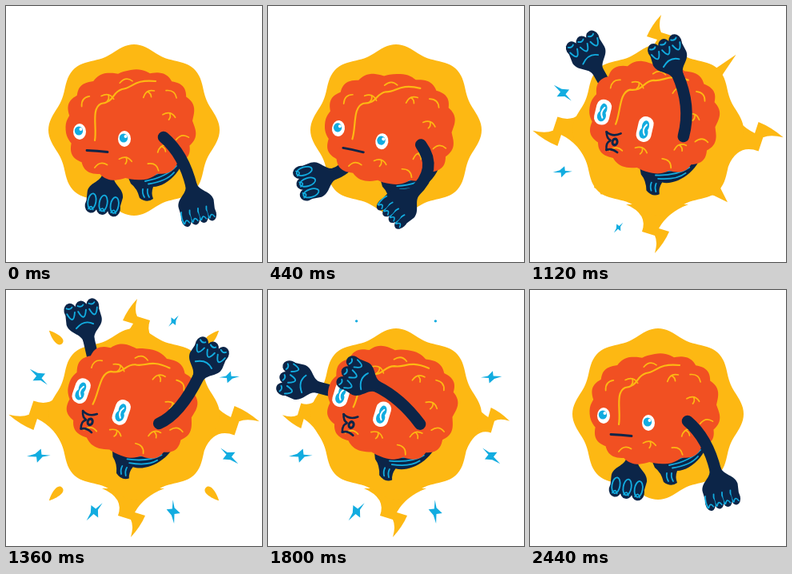
Write an HTML page with a canvas that moves like this. It is 320 px wide and 320 px high and loops after 2480 ms.

```html
<!DOCTYPE html>
<html lang="en">
<head>
<meta charset="utf-8">
<title>Dancing brain</title>
<style>
  html, body { margin: 0; width: 100%; height: 100%; overflow: hidden; background: #fff; }
  canvas { display: block; width: 100vw; height: 100vh; }
</style>
</head>
<body>
<canvas id="stage" width="320" height="320"></canvas>
<script>
const ctx = document.getElementById('stage').getContext('2d');
const LOOP = 2480, STEP = 40, TAU = Math.PI * 2, RAD = Math.PI / 180;
const ORANGE = '#f15022', YELLOW = '#fdb813', NAVY = '#0c2548', BLUE = '#12ace0', WHITE = '#fff';

// body: shift and tilt; arms: elbow and wrist
const poses = {
  rest: { body: [0, 0, 0], near: [222, 185, 232, 226], far: [131, 190, 127, 214] },
  left: { body: [-4, 4, 8], near: [212, 205, 180, 233], far: [112, 200, 78, 209] },
  right: { body: [9, 11, -11], near: [255, 150, 266, 200], far: [182, 200, 188, 223] },
  up: { body: [-1, -10, 13], near: [202, 125, 184, 85], far: [96, 102, 84, 80] },
  upRight: { body: [1, -10, 19], near: [218, 155, 241, 108], far: [110, 90, 103, 60] },
  upLeft: { body: [-1, -8, 17], near: [166, 135, 135, 120], far: [90, 130, 60, 121] }
};

// sag lowers the hands on the way to a pose, bow swings them outwards
const moves = [
  { time: 0, pose: 'rest' },
  { time: 400, pose: 'left', sag: 14, bow: 0 },
  { time: 800, pose: 'right', sag: 10, bow: 0 },
  { time: 1120, pose: 'up', sag: 0, bow: 45 },
  { time: 1360, pose: 'upRight', sag: 0, bow: 0 },
  { time: 1800, pose: 'upLeft', sag: 0, bow: 0 },
  { time: 2320, pose: 'rest', sag: 0, bow: 45 },
  { time: LOOP, pose: 'rest', sag: 0, bow: 0 }
];

const clamp = v => Math.min(1, Math.max(0, v));
const ramp = (t, start, length) => clamp((t - start) / length);
const ease = v => v * v * (3 - 2 * v);
const mix = (a, b, u) => a.map((v, i) => v + (b[i] - v) * u);
const polar = (r, degrees, x, y) => [x + r * Math.cos(degrees * RAD), y + r * Math.sin(degrees * RAD)];

function poseAt(t) {
  const next = moves.findIndex(m => m.time > t);
  const from = moves[next - 1], to = moves[next];
  const u = ease(ramp(t, from.time, to.time - from.time));
  const a = poses[from.pose], b = poses[to.pose], arch = Math.sin(Math.PI * u);
  const arm = (name, side) => {
    const [ex, ey, wx, wy] = mix(a[name], b[name], u);
    return [ex, ey, wx + side * to.bow * arch, wy + to.sag * arch];
  };
  return { body: mix(a.body, b.body, u), near: arm('near', 1), far: arm('far', -1) };
}

function fill(color) { ctx.fillStyle = color; ctx.fill(); }
function stroke(color, width) {
  ctx.strokeStyle = color; ctx.lineWidth = width;
  ctx.lineCap = ctx.lineJoin = 'round';
  ctx.stroke();
}
function polygon(points, color) {
  ctx.beginPath();
  points.forEach(p => ctx.lineTo(...p));
  ctx.closePath();
  fill(color);
}
function ellipse(x, y, rx, ry, color) {
  ctx.beginPath();
  ctx.ellipse(x, y, rx, ry, 0, 0, TAU);
  fill(color);
}
function arc(color, width, x, y, ...curve) {
  ctx.beginPath();
  ctx.moveTo(x, y);
  ctx.quadraticCurveTo(...curve);
  stroke(color, width);
}
function at(x, y, degrees, scale, draw) {
  ctx.save();
  ctx.translate(x, y);
  ctx.rotate(degrees * RAD);
  ctx.scale(scale, scale);
  draw();
  ctx.restore();
}

function drawBadge() {
  const points = [];
  for (let a = 0; a < 360; a += 2) points.push(polar(102.5 + 4.5 * Math.cos(8 * a * RAD), a, 160, 155));
  polygon(points, YELLOW);
}

function drawBolt(size) {
  const d = v => 98 + (v - 98) * size, s = v => v * Math.sqrt(size);
  ctx.beginPath();
  ctx.moveTo(88, -38);
  ctx.quadraticCurveTo(98, -12, d(118), s(-1));
  ctx.lineTo(d(122), s(-14));
  ctx.quadraticCurveTo(d(136), s(-8), d(149), s(4));
  ctx.quadraticCurveTo(d(135), s(0), d(127), s(4));
  ctx.lineTo(d(122), s(20));
  ctx.quadraticCurveTo(100, 12, 88, 40);
  fill(YELLOW);
}

function drawDrop() {
  ctx.beginPath();
  ctx.moveTo(12, 0);
  ctx.bezierCurveTo(3, -5, -11, -8, -11, 0);
  ctx.bezierCurveTo(-11, 8, 3, 5, 12, 0);
  fill(YELLOW);
}

function drawBurst(t) {
  for (let a = 0; a < 360; a += 90) {
    const leave = 1760 + 90 * Math.sin(a * RAD);
    const size = ease(ramp(t, 960, 140)) * (1 - ramp(t, leave, 160));
    if (size) at(160, 160, a, 1, () => drawBolt(size * (a % 180 ? 1 : 1.15)));
  }
  // Diagonal spikes grow clockwise, then break off as drops
  for (let i = 0; i < 4; i++) at(160, 157, 90 * i - 45, 1, () => {
    const spike = ease(ramp(t, 1020 + 40 * i, 100)) * (1 - ramp(t, 1150 + 20 * i, 100));
    const fly = ramp(t, 1180, 320);
    if (spike) polygon([[92, -16], [106, -5], [100 + 37 * spike, 1], [106, 7], [92, 16]], YELLOW);
    if (fly > 0 && fly < 1) at(128 + 18 * fly, 0, 0, Math.min(1, 3 * (1 - fly)), drawDrop);
  });
}

function drawSparks(t) {
  for (let i = 0; i < 8; i++) {
    const angle = 202.5 - 45 * i;
    const [x, y] = polar(129, angle, 160, 158);
    const size = Math.sqrt(ramp(t, 950 + 57 * i, 170)) * (1 - ramp(t, 1680 + y, 100));
    if (!size) continue;
    if (size < 0.35) ellipse(x, y, 9 * size, 9 * size, BLUE);
    else at(x, y, angle, size, () => polygon(
      [[-14, -5], [-4, -3], [5, -7], [3, 0], [14, 5], [3, 4], [-6, 7], [-4, 0]], BLUE));
  }
}

function drawHand(x, y, angle, fist, loops) {
  at(x, y, angle, 1, () => {
    ctx.beginPath();
    ctx.moveTo(-3, -7);
    ctx.bezierCurveTo(8, -8, 10, -22, 22, -23);
    ctx.lineTo(38, -21);
    ctx.lineTo(38, 21);
    ctx.lineTo(22, 22);
    ctx.bezierCurveTo(10, 22, 8, 8, -3, 7);
    fill(NAVY);

    const count = fist || loops ? 3 : 4, gap = 43 / count;
    for (let i = 0; i < count; i++) {
      const f = gap * (i - (count - 1) / 2);
      ellipse(38, f, 9.5, gap / 2 + 0.8, NAVY);
      if (fist) {
        arc(BLUE, 1.9, 35, f - 5, 19, f, 35, f + 5);
        arc(BLUE, 1.9, 42, f - 4, 39, f, 42, f + 3);
      } else if (loops) {
        ctx.beginPath();
        ctx.ellipse(33, f, 10, 5, 0, 0, TAU);
        stroke(BLUE, 1.8);
      } else {
        arc(BLUE, 1.8, 28, f + 4, 34, f + 6, 43, f + 4);
      }
      if (!fist) arc(BLUE, 1.6, 43, f - 3, 36, f, 43, f + 3);
    }
    if (fist) arc(BLUE, 1.9, 15, -12, 24, 0, 16, 10);
  });
}

function drawArm(shoulder, [ex, ey, wx, wy], fist, loops) {
  ctx.beginPath();
  ctx.moveTo(...shoulder);
  ctx.quadraticCurveTo(ex, ey, wx, wy);
  stroke(NAVY, 14.5);
  drawHand(wx, wy, Math.atan2(wy - ey, wx - ex) / RAD, fist, loops);
}

function drawStem() {
  ctx.beginPath();
  ctx.moveTo(150, 208);
  ctx.lineTo(224, 172);
  ctx.bezierCurveTo(228, 200, 203, 226, 184, 226);
  ctx.quadraticCurveTo(181, 234, 184, 241);
  ctx.quadraticCurveTo(176, 247, 167, 240);
  ctx.quadraticCurveTo(164, 228, 156, 222);
  fill(NAVY);
  for (let i = 0; i < 4; i++) {
    arc(BLUE, 1.8, 166 + 4 * i, 212 + 3.5 * i, 198 + i, 204 + 5 * i, 219 - 3 * i, 184 + 8 * i);
    if (i < 2) arc(BLUE, 1.8, 171 + 6 * i, 229, 170 + 6 * i, 234, 173 + 6 * i, 239);
  }
}

function drawBrain() {
  const power = v => Math.sign(v) * Math.abs(v) ** 0.85;
  const rim = (degrees, k) => {
    const a = degrees * RAD;
    return [80 * k * power(Math.cos(a)), 68 * k * power(Math.sin(a))];
  };
  at(156, 149, -4, 1, () => {
    const points = [];
    for (let a = 0; a < 360; a += 2) points.push(rim(a, 0.965 + 0.055 * Math.abs(Math.sin(7.5 * a * RAD))));
    polygon(points, ORANGE);
    // Small folds ring the brain, leaving the face free
    for (let i = 0; i < 11; i++) {
      const [x, y] = rim(i * 27 - 145, i % 2 ? 0.62 : 0.82);
      at(x, y, (i * 67) % 90 - 45, 1, () => {
        arc(YELLOW, 1.7, -8, 2, 0, -6, 8, 1);
        if (i % 2) arc(YELLOW, 1.7, 0, -2, 3, 2, 1, 6);
      });
    }
  });
  ctx.beginPath();
  ctx.moveTo(111, 168);
  ctx.bezierCurveTo(114, 152, 106, 128, 119, 122);
  ctx.bezierCurveTo(136, 120, 132, 108, 145, 104);
  ctx.bezierCurveTo(158, 103, 160, 91, 187, 94);
  stroke(YELLOW, 2.2);
}

function drawEye(excited) {
  if (excited) {
    ctx.beginPath();
    ctx.roundRect(-9.5, -16, 19, 32, 9);
    fill(WHITE);
    ellipse(0, -4, 4.5, 7, BLUE);
    ellipse(-0.5, 5, 5.5, 7, BLUE);
    arc(WHITE, 2, 1, -6, -4, 1, 1, 7);
  } else {
    ellipse(0, 0, 8, 10, WHITE);
    ellipse(-1, -1, 5.2, 5.6, BLUE);
    ellipse(1.5, -3, 2, 2, WHITE);
  }
}

function drawFace(excited) {
  at(92, 157, 0, 1, () => drawEye(excited));
  at(148, 166, 0, 1, () => drawEye(excited));
  if (excited) {
    arc(NAVY, 2.6, 120, 178, 111, 185, 102, 180);
    arc(NAVY, 2.6, 102, 180, 104, 188, 109, 189);
    arc(NAVY, 2.6, 109, 190, 104, 193, 107, 202);
    arc(NAVY, 2.6, 107, 202, 113, 198, 121, 202);
    ellipse(115, 190, 4.5, 5.5, NAVY);
    ellipse(115, 190, 1.5, 2.2, ORANGE);
  } else {
    arc(NAVY, 2.8, 101, 180.5, 114, 181, 127, 182.5);
  }
}

function render(t) {
  const { body: [dx, dy, tilt], near, far } = poseAt(t);
  const excited = t >= 1000 && t < 2000;
  const inBody = draw => at(155 + dx, 150 + dy, tilt, 1, () => { ctx.translate(-155, -150); draw(); });
  const attach = (x, y) => {
    const c = Math.cos(tilt * RAD), s = Math.sin(tilt * RAD);
    return [155 + dx + (x - 155) * c - (y - 150) * s, 150 + dy + (x - 155) * s + (y - 150) * c];
  };

  ctx.fillStyle = WHITE;
  ctx.fillRect(0, 0, 320, 320);
  drawBurst(t);
  drawBadge();
  drawSparks(t);
  inBody(drawStem);
  drawArm(attach(115, 150), far, excited, true);
  inBody(() => { drawBrain(); drawFace(excited); });
  drawArm(attach(197, 164), near, excited, false);
}

function tick() {
  const t = performance.now() % LOOP;
  render(Math.floor(t / STEP) * STEP);
  requestAnimationFrame(tick);
}
tick();
</script>
</body>
</html>
```
